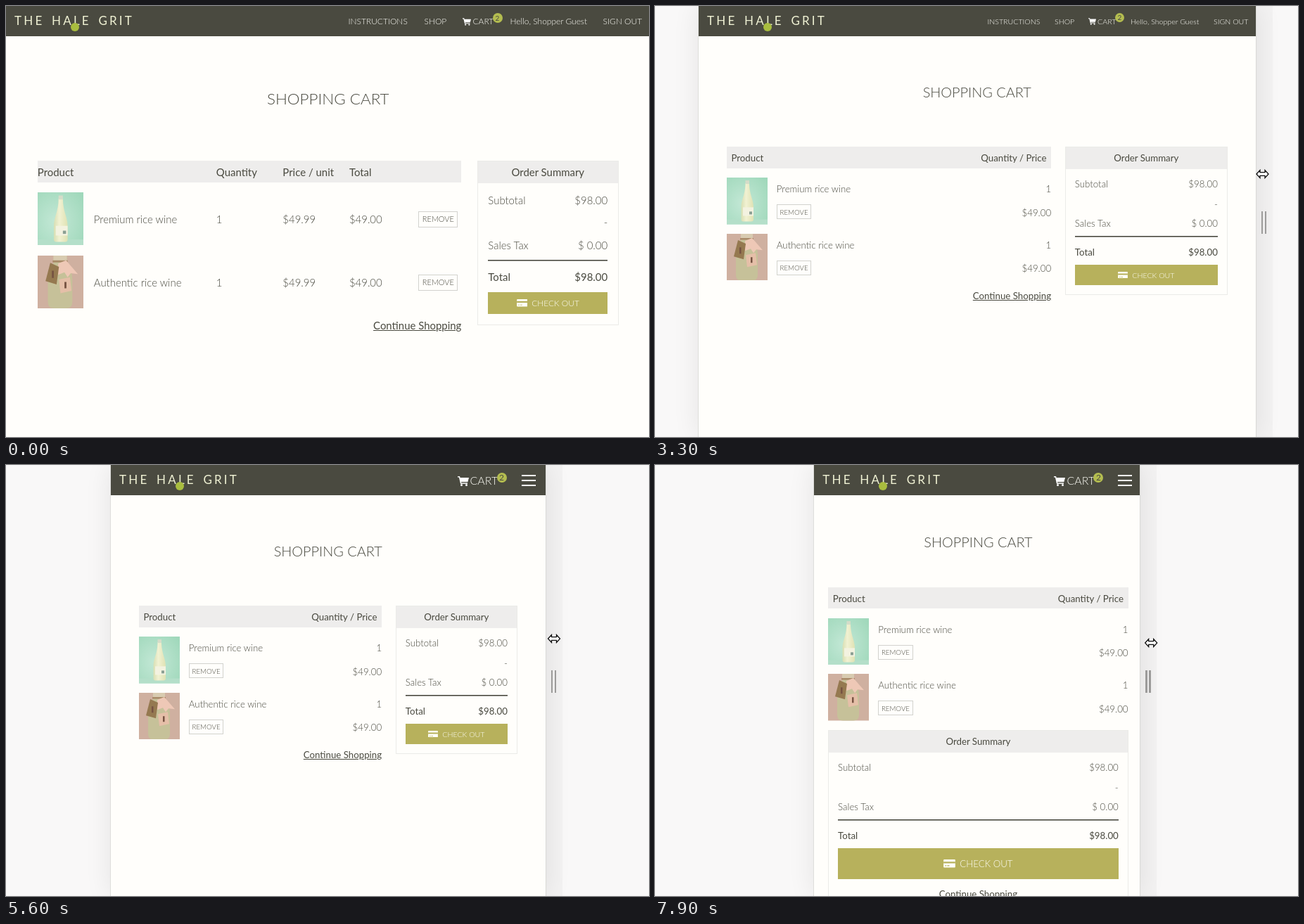
Animation of 914x613 px, one loop 8 s. Source, as an HTML page:

```html
<!DOCTYPE html>
<html lang="en">
<head>
<meta charset="utf-8">
<title>Responsive cart</title>
<style>
html, body { margin: 0; width: 100%; height: 100%; overflow: hidden; }
body { position: relative; background: #f9f8f8; font-family: Lato, sans-serif; font-weight: 300; color: #4a4a40; }
body * { position: absolute; box-sizing: border-box; }
svg * { position: static; }

#frame { top: 0; height: 613px; overflow: hidden; background: #fffefb; font-size: var(--u);
  box-shadow: 0 0 0 1px #dededb, 0 0 36px rgba(0,0,0,.09); }
#doc { left: 0; top: 0; height: 100%; }
.a { --u: 14.94px; }
.b, .c { --u: 13.28px; }
.t { white-space: nowrap; line-height: 20px; margin-top: -10px; }
.reg { font-weight: 400; }
.right { right: 0; }
.mid { left: 0; width: 100%; text-align: center; }

/* navigation */
nav { left: 0; top: 0; width: 100%; height: 43px; background: #4a4a40; color: #fffff8; }
.logo { left: 12px; top: 21px; font-size: 17px; font-weight: 400; letter-spacing: 3.2px; word-spacing: 3px; color: #f0f2d4; }
.mark { left: 92px; top: 24px; width: 12px; height: 12px; border-radius: 50%; background: #a9bd3f; }
.item { top: 22px; font-size: .8em; left: calc(100% - var(--a) * 1px); }
.b .item { left: calc(100% - var(--b) * 1px); }
.c .item, .m .item { left: calc(100% - var(--c) * 1px); }
.m .wide { display: none; }
.m .cart { font-size: 1.2em; }
.icon { top: 17px; width: 12px; height: 11px; left: calc(100% - 267px); }
.b .icon { width: 11px; height: 10px; left: calc(100% - 238px); }
.m .icon { top: 16px; width: 16px; height: 14px; left: calc(100% - 125px); }
.badge { left: calc(100% - 224px); top: 9.5px; width: 14px; height: 14px; border-radius: 50%;
  background: #b4bd50; color: #4a4a40; font: 400 10px/14px Lato, sans-serif; text-align: center; }
.b .badge { left: calc(100% - 199.5px); top: 10px; width: 13px; height: 13px; line-height: 13px; }
.m .badge { left: calc(100% - 69px); top: 10.5px; width: 14px; height: 14px; line-height: 14px; font-size: 12px; }
.burger { display: none; top: 14px; left: calc(100% - 34px); width: 20px; height: 16px;
  background: linear-gradient(#fff 2px, transparent 2px 7px, #fff 7px 9px, transparent 9px 14px, #fff 14px); }
.m .burger { display: block; }

h1 { margin: 0; font-size: 1.5em; font-weight: 300; top: 132px; }
.b h1 { top: 122px; }
.c h1 { top: 109px; }

/* product table */
#cart { left: 3em; top: 220px; width: calc((100% - 7.5em) * .75); }
.b #cart { top: 200px; width: calc((100% - 7.5em) * 2 / 3); }
.c #cart { left: 1.5em; top: 173.5px; width: calc(100% - 3em); }
.bar { left: 0; top: 0; width: 100%; height: 30.5px; background: #eeedec; font-weight: 400; }
.bar .t { top: 16px; }
.b .bar .first, .c .bar .first { left: .5em; }
.bar .right { right: .5em; }
.row { left: 0; width: 100%; top: 45px; }
.row + .row { top: 135px; }
.row .t { top: 38px; }
.row svg { left: 0; top: 0; width: 65px; height: 75px; }
.row .name { left: 80px; }
.col2 { left: calc(39.5% + 16px); }
.col3 { left: calc(60.5% - 16px); }
.col4 { left: calc(81% - 45px); }
.remove { right: 5px; top: 27px; width: 56px; height: 22.5px; border: 1px solid #d2d2ce; text-align: center; }
.remove span { left: 0; width: 100%; top: 50%; margin-top: -10px; line-height: 20px; font-size: .735em; }
.a .slim, .b .full, .c .full { display: none; }
.b .row, .c .row { top: 44px; }
.b .row + .row, .c .row + .row { top: 123.5px; }
.b .row svg, .c .row svg { width: 58px; height: 66.5px; }
.b .row .t, .c .row .t { top: 16px; }
.b .row .price, .c .row .price { top: 49.5px; }
.b .name, .c .name { left: 71px !important; }
.b .remove, .c .remove { left: 71px; top: 38px; width: 49.5px; height: 21px; }
.more { text-decoration: underline; font-weight: 400; }
#cart .more { top: 234px; }
.b #cart .more { top: 212px; }
.c #cart .more, #sum .more { display: none; }
.c #sum .more { display: block; top: 233px; }

/* order summary */
#sum { right: 3em; top: 220px; height: 234px; width: calc((100% - 7.5em) * .25); }
#sum::after { content: ""; position: absolute; inset: 0; border: 1px solid #ebebe8; }
.b #sum { top: 200px; height: 211px; width: calc((100% - 7.5em) / 3); }
.c #sum { right: 1.5em; top: 377px; height: 270px; width: calc(100% - 3em); }
#sum .bar { height: 31.5px; }
.line { left: 1.04em; right: 1.04em; }
.r1 { top: 56px; } .r2 { top: 87px; } .r3 { top: 120px; } .r4 { top: 165px; }
.rule { top: 141px; height: 2px; background: linear-gradient(#45453c 1px, #45453c90 1px); }
.pay { top: 187px; height: 31px; background: #b7b15c; color: #fffff8; font-size: .8em;
  display: flex; align-items: center; justify-content: center; gap: 6px; }
.line.pay { left: 1.3em; right: 1.3em; }
.pay * { position: static; }
.pay svg { width: 15.5px; height: 10.5px; }
.b .r1, .c .r1 { top: 53px; }
.b .r2, .c .r2 { top: 82px; }
.b .r3, .c .r3 { top: 109px; }
.b .r4, .c .r4 { top: 150px; }
.b .rule, .c .rule { top: 127px; }
.b .pay, .c .pay { top: 168px; height: 29px; }
.b .pay svg { width: 14px; height: 9.5px; }
.c .pay { height: 44px; font-size: 1em; }
.c .line.pay { left: 1.04em; right: 1.04em; }
.c .pay svg { width: 17px; height: 11.5px; }

/* resize handle */
#grip { top: 0; width: 24px; height: 613px; background: rgba(0,0,0,.022); }
#grip i { top: 292px; width: 2.5px; height: 32px; background: #9c9b9a; }
#cursor { left: 0; top: 0; width: 20px; height: 14px; }
</style>
</head>
<body>
<div id="frame" class="a"><div id="doc">
  <nav>
    <span class="t logo">THE HALE GRIT</span><i class="mark"></i>
    <span class="t item wide" style="--a:429;--b:381">INSTRUCTIONS</span>
    <span class="t item wide" style="--a:321;--b:285.5">SHOP</span>
    <svg class="icon" viewBox="0 0 16 14"><path fill="#fff" d="M0 0h3l.6 2H16l-1.6 6H5l.3 1.2H14v1.5H4L1.9 1.5H0z"/><circle cx="5.5" cy="12.4" r="1.5" fill="#fff"/><circle cx="12.5" cy="12.4" r="1.5" fill="#fff"/></svg>
    <span class="t item cart" style="--a:252;--b:224.5;--c:107">CART</span><span class="badge">2</span>
    <span class="t item wide" style="--a:199;--b:177.5">Hello, Shopper Guest</span>
    <span class="t item wide" style="--a:67;--b:59.5">SIGN OUT</span>
    <i class="burger"></i>
  </nav>
  <h1 class="t mid">SHOPPING CART</h1>

  <section id="cart">
    <div class="bar">
      <span class="t first">Product</span>
      <span class="t full col2">Quantity</span><span class="t full col3">Price / unit</span><span class="t full col4">Total</span>
      <span class="t slim right">Quantity / Price</span>
    </div>
    <div class="row">
      <svg viewBox="0 0 58 66" preserveAspectRatio="none">
        <defs>
          <radialGradient id="mint" cx=".4" cy=".55" r=".75"><stop stop-color="#c3e8d6"/><stop offset="1" stop-color="#a0d8bb"/></radialGradient>
          <linearGradient id="milk"><stop stop-color="#d8dfb4"/><stop offset=".4" stop-color="#f1f1d2"/><stop offset="1" stop-color="#dfe2b4"/></linearGradient>
        </defs>
        <path fill="url(#mint)" d="M0 0h58v66H0z"/><path fill="#b4dfc9" d="M0 59h58v7H0z"/>
        <path fill="url(#milk)" d="M26.5 8h5.500C32 24 38 31 38 42v17q0 3-3 3H23.500q-3 0-3-3V42C20.500 31 26.500 24 26.500 8z"/>
        <path fill="#d5dcc9" d="M26.500 4h5.500v5h-5.500z"/><path fill="#f3f2e0" d="M23 42h15v12H23z"/><path fill="#8b9f93" d="M32 48h4v4h-4z"/>
      </svg>
      <span class="t name">Premium rice wine</span>
    </div>
    <div class="row">
      <svg viewBox="0 0 58 66" preserveAspectRatio="none">
        <path fill="#cfb0a0" d="M0 0h58v66H0z"/>
        <path fill="#c6c199" d="M20 0h17v10q7 8 7 20v28q0 8-8 8H21q-8 0-8-8V30q0-12 7-20z"/>
        <path fill="#d8cbb0" d="M20 0h17v6H20z"/><path fill="#a98a68" d="M19 6h19v2.500H19z"/>
        <path fill="#eec8b6" d="M26 10l10-4 15 17-9-1-4 5-4-6-8 3z"/>
        <path fill="#957950" d="M16 9l11 5-3 22-14-4z"/><path fill="#e5bfa8" d="M27 30l14-3 2 17-14 3z"/>
        <path fill="#765342" d="M34 33h2.500v8H34zM18 19h2.500v9H18z"/>
      </svg>
      <span class="t name">Authentic rice wine</span>
    </div>
    <span class="t more right">Continue Shopping</span>
  </section>

  <section id="sum">
    <div class="bar"><span class="t mid">Order Summary</span></div>
    <div class="line r1"><span class="t">Subtotal</span><span class="t right">$98.00</span></div>
    <div class="line r2"><span class="t right">-</span></div>
    <div class="line r3"><span class="t">Sales Tax</span><span class="t right">$ 0.00</span></div>
    <div class="line rule"></div>
    <div class="line r4 reg"><span class="t">Total</span><span class="t right">$98.00</span></div>
    <div class="line pay"><svg viewBox="0 0 16 11"><rect width="16" height="11" rx="1" fill="#fffff8"/><path fill="#b7b15c" d="M0 3h16v2.200H0zM2 8h2v1H2zM5 8h3v1H5z"/></svg><span>CHECK OUT</span></div>
    <span class="t mid more">Continue Shopping</span>
  </section>
</div></div>
<div id="grip"><i style="left:8px"></i><i style="left:13px"></i></div>
<svg id="cursor" viewBox="-10 -7 20 14"><path d="M-8.500 0L-3.500-5.500V-2.300H3.500V-5.500L8.500 0 3.500 5.500V2.300H-3.500V5.500z" fill="#fff" stroke="#111" stroke-width="1.300"/></svg>

<script>
const LOOP = 8000, STEP = 100, STAGE = 915.5;

// [ms, left edge of the page]
const EDGE = [[1000, 0], [1800, 25], [1900, 27], [2100, 30], [2200, 30], [2700, 47], [2800, 47],
  [3300, 62], [3500, 70], [3600, 70], [4500, 114], [4600, 115], [4800, 129], [4900, 129],
  [5100, 139], [5400, 139], [5600, 149], [6300, 182.5], [6500, 187.3], [7200, 201],
  [7600, 223], [7700, 223], [7900, 226.3]];

// [ms, distance from right edge, y]
const POINTER = [[1000, 16, 228], [1800, 15.5, 231], [3300, 10, 239], [4600, 13, 244],
  [5600, 12.5, 247], [6500, 13.5, 249], [7900, 16, 253]];

// [from, to, time whose layout is still shown]
const LAGS = [[5100, 5300, 5000], [6500, 6600, 6400], [7900, 8000, 7800]];

const $ = id => document.getElementById(id);
const frame = $('frame'), doc = $('doc'), grip = $('grip'), cursor = $('cursor');

// Linear interpolation of one column of a step table.
function at(table, t, col = 1) {
  const i = table.findIndex(k => k[0] > t);
  if (i === 0) return table[0][col];
  if (i < 0) return table[table.length - 1][col];
  const p = table[i - 1], q = table[i];
  return p[col] + (q[col] - p[col]) * (t - p[0]) / (q[0] - p[0]);
}

const widthAt = t => STAGE - 2 * at(EDGE, t);

function layoutClass(w) {
  if (w > 850) return 'a';
  return (w > 498 ? 'b' : 'c') + (w < 638.5 ? ' m' : '');
}

function render(t) {
  const left = at(EDGE, t), right = STAGE - left;
  const lag = LAGS.find(([from, to]) => t >= from && t < to);
  const w = widthAt(lag ? lag[2] : t);
  frame.className = layoutClass(w);
  frame.style.left = left + 'px';
  frame.style.width = right - left + 'px';
  doc.style.width = w + 'px';
  grip.style.left = right + 'px';
  cursor.style.transform =
    `translate(${right + at(POINTER, t) - 10}px, ${at(POINTER, t, 2) - 7}px)`;
}

// Both product rows share the same cells.
for (const row of document.querySelectorAll('.row')) {
  row.insertAdjacentHTML('beforeend', `
    <span class="t full col2">1</span><span class="t full col3">$49.99</span><span class="t full col4">$49.00</span>
    <span class="t slim right">1</span><span class="t slim right price">$49.00</span>
    <div class="remove"><span>REMOVE</span></div>`);
}

const start = performance.now();
let shown = -1;
function tick() {
  const t = Math.floor((performance.now() - start) % LOOP / STEP) * STEP;
  if (t !== shown) render(shown = t);
  requestAnimationFrame(tick);
}
tick();
</script>
</body>
</html>
```
